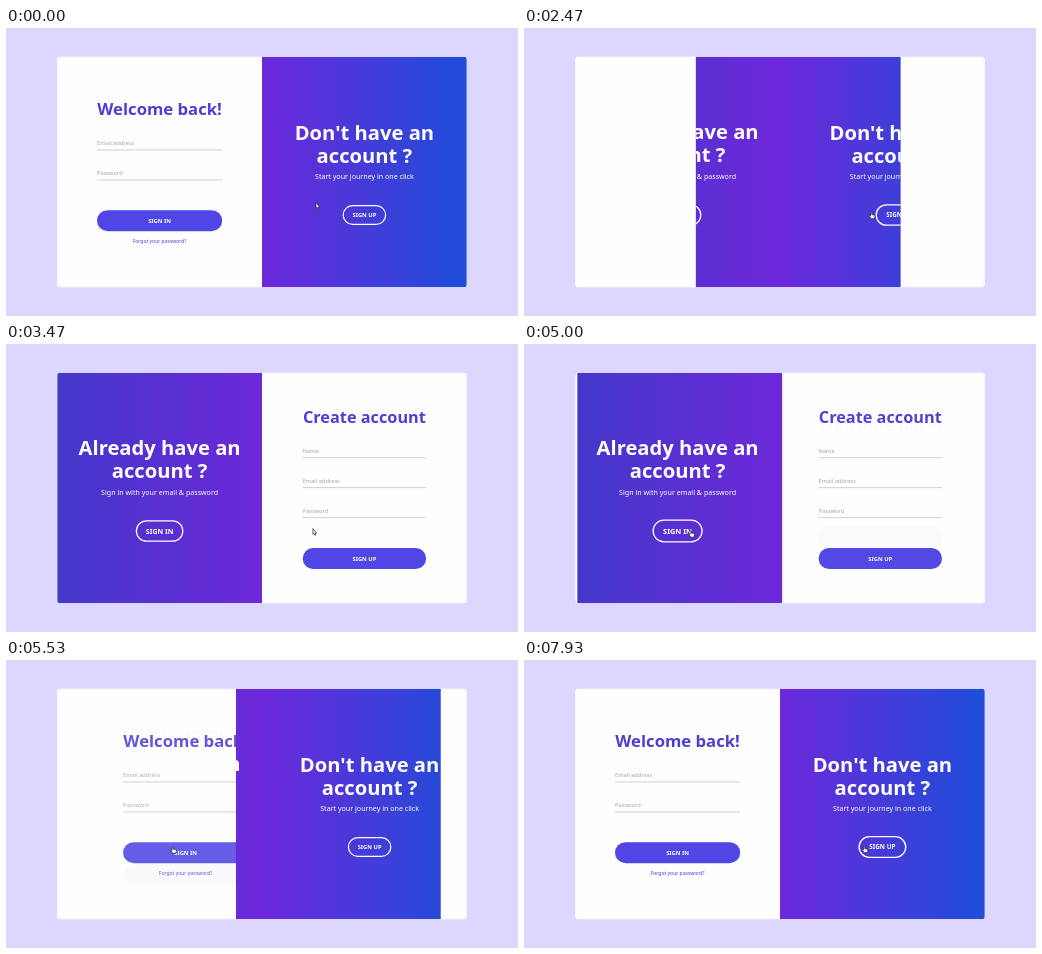
An HTML page for the animation above (8 s loop, 512 by 288 pixels).

```html
<!DOCTYPE html>
<html lang="en">
<head>
<meta charset="utf-8">
<title>Sign in / sign up slider</title>
<style>
html, body { margin: 0; width: 100%; height: 100%; overflow: hidden; background: #ddd6fe; }
svg { display: block; width: 100%; height: 100%; font-family: "Noto Sans", "Open Sans", sans-serif; }
text { text-anchor: middle; fill: #fff; }
.title { font-weight: 700; fill: #4c3fd2; }
.big { font-weight: 700; font-size: 20.2px; }
.sub { font-size: 7.1px; }
.label { font-size: 5.7px; text-anchor: start; fill: #a3a3ad; }
.btn { font-weight: 600; font-size: 5.8px; }
.link { font-size: 5px; font-weight: 500; fill: #4c3fd2; }
.line { stroke: #c6c6ce; stroke-width: .8; }
.fill { fill: #4f46e5; }
.ring { fill: none; stroke: #fff; stroke-width: 1.2; }
</style>
</head>
<body>
<svg viewBox="0 0 512 288">
  <defs>
    <linearGradient id="grad" gradientUnits="userSpaceOnUse" x1="51.2" y1="0" x2="460.8" y2="0">
      <stop offset="0" stop-color="#4338ca"/>
      <stop offset=".5" stop-color="#6d28d9"/>
      <stop offset="1" stop-color="#1d4ed8"/>
    </linearGradient>
    <clipPath id="card"><rect x="51.2" y="28.8" width="409.6" height="230.4" rx="3"/></clipPath>
    <clipPath id="window"><rect id="pane" x="256" y="28.8" width="204.8" height="230.4"/></clipPath>
  </defs>
  <g clip-path="url(#card)">
    <rect x="51" y="28" width="411" height="232" fill="#fefefe"/>
    <g id="signUp">
      <text class="title" x="358.4" y="79" font-size="16.3">Create account</text>
      <g id="upFields"></g>
      <rect class="fill" x="296.7" y="204" width="123.4" height="21" rx="10.5"/>
      <text class="btn" x="358.4" y="216.7">SIGN UP</text>
    </g>
    <g id="signIn">
      <text class="title" x="153.6" y="87" font-size="16.7">Welcome back!</text>
      <g id="inFields"></g>
      <rect class="fill" x="91" y="182.2" width="125.2" height="21" rx="10.5"/>
      <text class="btn" x="153.6" y="195">SIGN IN</text>
      <text class="link" x="153.6" y="214.8">Forgot your password?</text>
    </g>
    <g clip-path="url(#window)">
      <rect x="51" y="28" width="411" height="232" fill="url(#grad)"/>
      <g>
        <text class="big" x="153.6" y="111.3">Already have an</text>
        <text class="big" x="153.6" y="134">account ?</text>
        <text class="sub" x="153.6" y="150.8">Sign in with your email &amp; password</text>
        <g id="leftBtn">
          <rect class="ring" x="130.4" y="176.8" width="46.4" height="20.4" rx="10.2"/>
          <text class="btn" x="153.6" y="189.6" style="font-size:7px">SIGN IN</text>
        </g>
      </g>
      <g id="rightPanel">
        <text class="big" x="358.4" y="111.8">Don't have an</text>
        <text class="big" x="358.4" y="134.5">account ?</text>
        <text class="sub" x="358.4" y="151.4">Start your journey in one click</text>
        <g id="rightBtn">
          <rect class="ring" x="337.2" y="177.6" width="42.4" height="18.8" rx="9.4"/>
          <text class="btn" x="358.4" y="189">SIGN UP</text>
        </g>
      </g>
    </g>
  </g>
  <g id="cursor" fill="#fff" stroke="#222" stroke-width=".7" stroke-linejoin="round">
    <path id="arrow" d="M0-3.5V2.2L1.2 1.3 2 3.2 3 2.8 2.2 1 3.6 .9Z"/>
    <path id="hand" d="M-1.4-3q.7-.7 1.2 0V-.9L2.2-.4Q3-.1 2.9 .8L2.4 3.2H-.6L-2.7 .7Q-2.6-.4-1.4 .4Z"/>
  </g>
</svg>
<script>
const LOOP = 8000, HALF = 204.8, SLIDE = 1000;
const OPEN = 2155, CLOSE = 4935; // clicks on SIGN UP and SIGN IN
const el = id => document.getElementById(id);
const clamp = v => Math.min(1, Math.max(0, v));
const smooth = v => v * v * (3 - 2 * v);

// cubic-bezier(.4, 0, .2, 1)
function ease(x) {
  if (x <= 0 || x >= 1) return clamp(x);
  let lo = 0, hi = 1, s;
  for (let i = 0; i < 24; i++) {
    s = (lo + hi) / 2;
    const r = 1 - s;
    if (1.2 * r * r * s + .6 * r * s * s + s * s * s < x) lo = s; else hi = s;
  }
  return s * s * (3 - 2 * s);
}

function fields(id, x, width, y, names) {
  el(id).innerHTML = names.map((name, i) => {
    const line = y + 4.7 + i * 30;
    return `<text class="label" x="${x}" y="${y + i * 30}">${name}</text>
      <path class="line" d="M${x} ${line}h${width}"/>`;
  }).join("");
}
fields("upFields", 296.7, 123.4, 108.9, ["Name", "Email address", "Password"]);
fields("inFields", 91, 125.2, 117.2, ["Email address", "Password"]);

// time, x, y
const path = [
  [0, 310, 178], [1400, 310, 178], [1730, 386, 134], [2000, 348, 187.5],
  [3100, 348, 187.5], [4300, 167.5, 190], [6600, 167.5, 190],
  [7270, 181, 190], [7400, 181, 190], [7870, 341, 189.5], [LOOP, 341, 189.5]
];
function pointer(t) {
  const i = path.findIndex(k => k[0] > t);
  const [t0, x0, y0] = path[i - 1], [t1, x1, y1] = path[i];
  const k = smooth((t - t0) / (t1 - t0));
  return [x0 + (x1 - x0) * k, y0 + (y1 - y0) * k];
}

const hover = (t, on, off) => ease((t - on) / 150) - ease((t - off) / 150);
const shift = (id, x) => el(id).setAttribute("transform", `translate(${x} 0)`);
const zoom = (id, x, y, s) =>
  el(id).setAttribute("transform", `translate(${x} ${y}) scale(${s}) translate(${-x} ${-y})`);

function draw(t) {
  const p = ease((t - OPEN) / SLIDE) - ease((t - CLOSE) / SLIDE);
  el("pane").setAttribute("x", 256 - HALF * p);
  shift("rightPanel", HALF * .2 * p);
  shift("signIn", HALF * p);
  shift("signUp", HALF * (p - 1));
  el("signIn").setAttribute("opacity", 1 - p);
  // the new form pops in halfway, but fades out
  el("signUp").setAttribute("opacity", t < CLOSE ? +(t >= OPEN + SLIDE / 2) : p * p);

  zoom("rightBtn", 358.4, 187, 1 + .1 * (hover(t, 1880, 2440) + hover(t, 7780, 9000)));
  zoom("leftBtn", 153.6, 187, 1 + .055 * hover(t, 4180, 5300));

  const [x, y] = pointer(t);
  shift("cursor", 0);
  el("cursor").setAttribute("transform", `translate(${x} ${y})`);
  const onButton = t > 1900 && t < 3250 || t > 4150 && t < 7560 || t > 7780;
  el("hand").setAttribute("visibility", onButton ? "visible" : "hidden");
  el("arrow").setAttribute("visibility", onButton ? "hidden" : "visible");
}

function frame() {
  draw(performance.now() % LOOP);
  requestAnimationFrame(frame);
}
frame();
</script>
</body>
</html>
```
